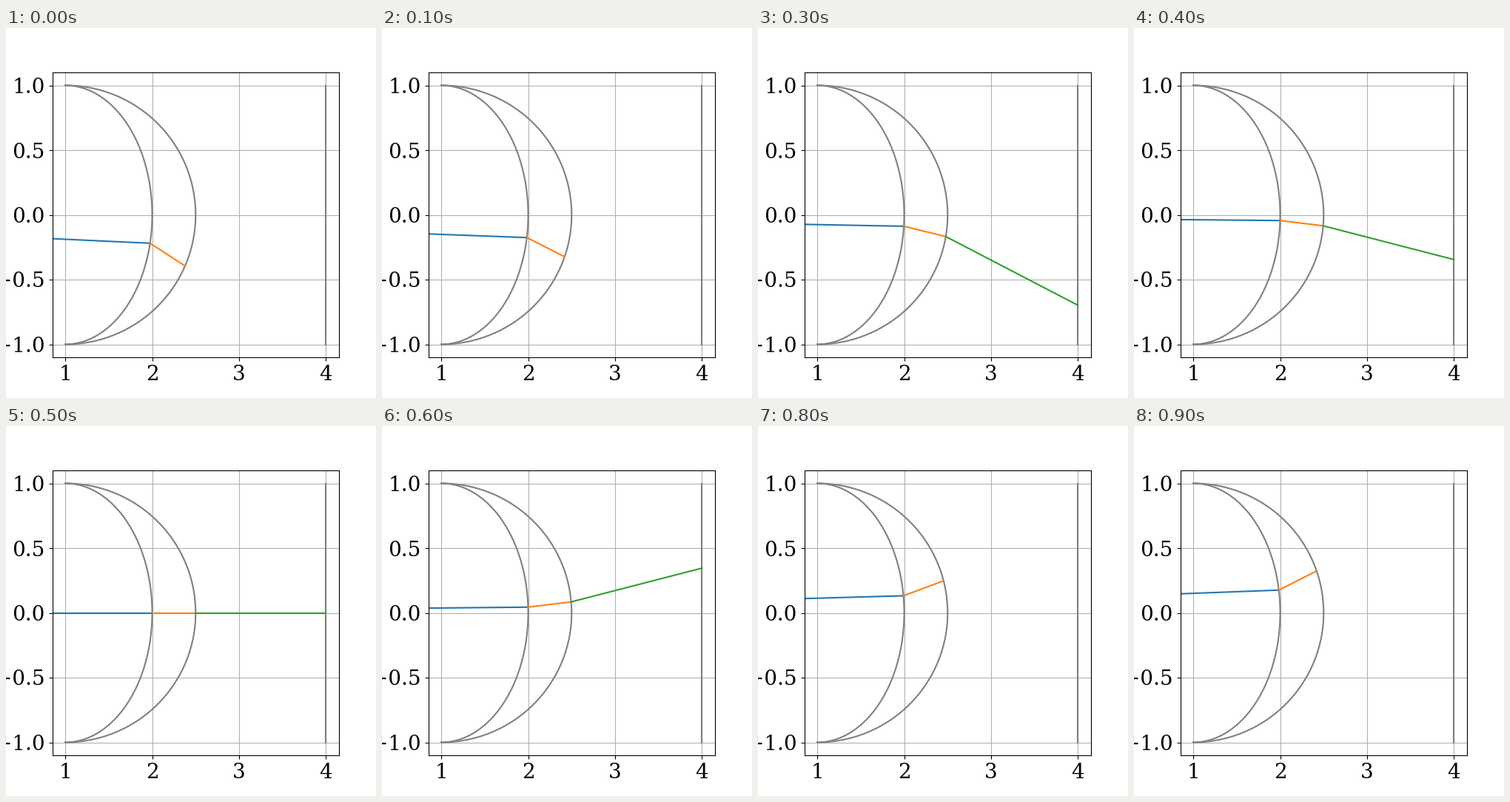
A matplotlib script that plays this animation: 500x500 px, repeating every 1000 ms.

```python
import numpy as np
import matplotlib.pyplot as plt
from matplotlib.animation import FuncAnimation

FRAMES = 10
SOURCE = np.array([-5.0, 0.0])
CENTER = np.array([1.0, 0.0])
INNER, OUTER = 1.0, 1.5  # horizontal semi-axes; the vertical ones are 1
SCREEN_X = 4.0

plt.rcParams["font.family"] = "DejaVu Serif"
plt.rcParams["font.size"] = 20


def hit_ellipse(point, direction, a):
    """Far intersection of a ray with the ellipse of semi-axes (a, 1)."""
    scale = np.array([1 / a, 1.0])
    p, d = (point - CENTER) * scale, direction * scale
    qa, qb, qc = d @ d, p @ d, p @ p - 1
    return point + direction * (-qb + np.sqrt(qb * qb - qa * qc)) / qa


def refract(point, direction, a):
    """Refraction with relative index -1: mirror the ray about the normal."""
    normal = (point - CENTER) / np.array([a * a, 1.0])
    normal /= np.hypot(*normal)
    return 2 * (direction @ normal) * normal - direction


def trace(angle):
    d0 = np.array([np.cos(angle), np.sin(angle)])
    p1 = hit_ellipse(SOURCE, d0, INNER)
    d1 = refract(p1, d0, INNER)
    p2 = hit_ellipse(p1, d1, OUTER)
    d2 = refract(p2, d1, OUTER)
    p3 = p2 + d2 * (SCREEN_X - p2[0]) / d2[0]
    return SOURCE, p1, p2, p3


fig, ax = plt.subplots(figsize=(5, 5), dpi=100)
ax.set(xlim=(0.85, 4.15), ylim=(-1.1, 1.1),
       xticks=[1, 2, 3, 4], yticks=[-1, -0.5, 0, 0.5, 1])
ax.grid(True)

t = np.linspace(-np.pi / 2, np.pi / 2, 200)
for a in (INNER, OUTER):
    ax.plot(CENTER[0] + a * np.cos(t), np.sin(t), color="gray")
ax.plot([SCREEN_X, SCREEN_X], [-1, 1], color="gray")
rays = [ax.plot([], [], color=c)[0] for c in ("tab:blue", "tab:orange", "tab:green")]


def update(i):
    points = trace((i - FRAMES // 2) * np.pi / 500)
    for ray, start, end in zip(rays, points, points[1:]):
        ray.set_data([start[0], end[0]], [start[1], end[1]])
    # The last segment shows only when it lands on the screen.
    rays[-1].set_visible(abs(points[-1][1]) <= 1)
    return rays


anim = FuncAnimation(fig, update, frames=FRAMES, interval=100, repeat=True)
plt.show()
```
